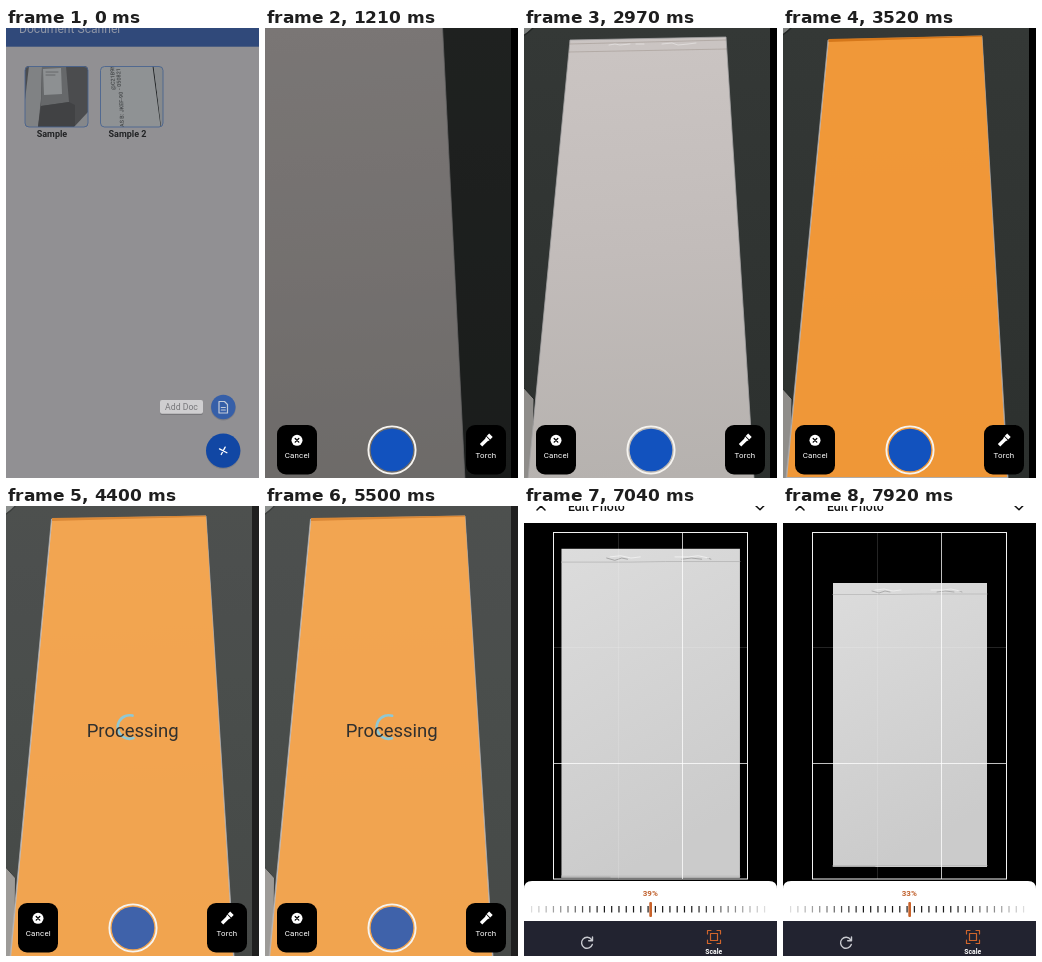
Write an HTML page that moves like this. It is 253 by 450 pixels and loops after 8000 ms.

```html
<!DOCTYPE html>
<html lang="en">
<head>
<meta charset="utf-8">
<title>Document scanning demo</title>
<style>
  html, body { margin: 0; width: 100%; height: 100%; overflow: hidden; background: #000; }
  svg { display: block; width: 100vw; height: 100vh; }
  text { font-family: Roboto, "Liberation Sans", sans-serif; }
  .mid { text-anchor: middle; }
  .line { fill: none; stroke-linecap: round; stroke-linejoin: round; }
</style>
</head>
<body>
<svg viewBox="0 0 253 450" preserveAspectRatio="none">
  <defs>
    <linearGradient id="paperTone" gradientUnits="userSpaceOnUse" x1="60" y1="0" x2="90" y2="450">
      <stop offset="0" stop-color="#cbc5c3"/><stop offset=".5" stop-color="#c2bcba"/><stop offset="1" stop-color="#b6b2af"/>
    </linearGradient>
    <linearGradient id="tableTone" x1="0" y1="0" x2="0" y2="1">
      <stop offset="0" stop-color="#343836"/><stop offset="1" stop-color="#2c302e"/>
    </linearGradient>
    <linearGradient id="scanTone" x1="0" y1="0" x2=".3" y2="1">
      <stop offset="0" stop-color="#dcdcdc"/><stop offset="1" stop-color="#cbcbcb"/>
    </linearGradient>
    <clipPath id="view"><rect width="246" height="450"/></clipPath>
    <clipPath id="thumb1"><rect x="19" y="38" width="63" height="61" rx="4"/></clipPath>
    <clipPath id="thumb2"><rect x="94" y="38" width="63" height="61" rx="4"/></clipPath>
    <clipPath id="stage"><rect y="17" width="253" height="358"/></clipPath>
  </defs>

  <g id="home">
    <rect width="253" height="450" fill="#919093"/>
    <rect width="253" height="18.700" fill="#30497a"/>
    <text x="13" y="5.300" font-size="12.100" fill="#8f96a6">Document Scanner</text>
    <g clip-path="url(#thumb1)">
      <path fill="#4b4c4e" d="M19 38h63v61H19z"/>
      <path fill="#808284" d="M23 38h13l-1 33-3 28H19V72z"/>
      <path fill="#66686a" d="M36 38h24l3 36-28 4z"/>
      <path fill="#8d9092" d="M37 41l18-1 1 26-18 1z"/>
      <path fill="#414244" d="M35 78l28-4 6 3v22H32z"/>
      <path fill="#85878a" d="M82 84v15H68z"/>
      <path class="line" stroke="#66686a" d="M40 44h12M40 47h9"/>
    </g>
    <g clip-path="url(#thumb2)">
      <path fill="#8f9294" d="M94 38h63v61H94z"/>
      <path class="line" stroke="#25282a" d="M147 38l8 60"/>
      <path fill="#878a8c" d="M148 38h9v61h-2z"/>
      <g font-size="5.500" font-weight="500" fill="#45484a">
        <text transform="translate(118 99) rotate(-92)">AS B: JKEF-90</text>
        <text transform="translate(109 62) rotate(-92)">@C21B9N</text>
        <text transform="translate(115 62) rotate(-92)">- 050821</text>
      </g>
    </g>
    <g fill="none" stroke="#4a6590" stroke-width=".9">
      <rect x="19" y="38.500" width="63" height="60.500" rx="4"/>
      <rect x="94.500" y="38.500" width="62.500" height="60.500" rx="4"/>
    </g>
    <g class="mid" font-size="9" font-weight="700" fill="#222325">
      <text x="46" y="109">Sample</text><text x="121.500" y="109">Sample 2</text>
    </g>
    <g id="dial">
      <rect x="154" y="373" width="43" height="14" rx="2" fill="#77767a"/>
      <rect x="154" y="372" width="43" height="13.700" rx="2" fill="#cfced0"/>
      <text class="mid" x="175.500" y="382" font-size="8.700" fill="#77777a">Add Doc</text>
      <circle cx="217.300" cy="380" r="12.500" fill="#7e7e84"/>
      <circle cx="217.300" cy="379" r="12.200" fill="#365fa8"/>
      <path class="line" stroke="#c3cbda" stroke-width="1.200" d="M213 373.500h5.500l3 3v8.500H213zM215.300 379.500h4M215.300 382h4"/>
    </g>
    <circle cx="217.200" cy="423.700" r="17.300" fill="#808086"/>
    <circle cx="217.200" cy="422.600" r="17.200" fill="#1147a4"/>
    <path id="plus" class="line" stroke="#fff" stroke-width="1.300" d="M-4.200 0h8.400M0-4.200v8.400"/>
  </g>

  <g id="camera">
    <rect width="253" height="450"/>
    <g id="preview" clip-path="url(#view)">
      <rect width="246" height="450" fill="url(#tableTone)"/>
      <g id="floor">
        <path fill="#8f8d8a" stroke="#222524" d="M-60 300L0 360L10 371L9 470H-60z"/>
        <path fill="#7d807e" stroke="#222524" stroke-width="1.500" d="M-40-40H34L9 0Q4 5-1 8L-40 30z"/>
      </g>
      <polygon id="paper" fill="url(#paperTone)" stroke="#a5a4a5" stroke-width=".8"/>
      <g id="fold" class="line">
        <path id="foldLine" stroke="#3a2a18" stroke-opacity=".16" stroke-width="1.200"/>
        <path id="foldMarks" stroke="#fff" stroke-opacity=".4" d="M39 5l6-1 5 1 10-1M92 4l10-1 6 2 10-1 8-1M66 4h8"/>
      </g>
      <g id="detected">
        <polygon id="cover" fill="#f4952f" fill-opacity=".93"/>
        <polygon id="rim" fill="#d5771a"/>
      </g>
    </g>
    <rect id="veil" width="253" height="450" fill="#fff" opacity=".12"/>
    <circle cx="127" cy="422" r="23.600" fill="none" stroke="#f6f4f0" stroke-width="1.900"/>
    <circle id="shutter" cx="127" cy="422" r="21.300"/>
    <g>
      <rect x="12" y="397" width="40" height="49.500" rx="9"/>
      <rect x="201" y="397" width="40" height="49.500" rx="9"/>
      <circle cx="32" cy="412.300" r="5.500" fill="#fff"/>
      <path class="line" stroke="#000" stroke-width="1.300" d="M30.200 410.500l3.600 3.600m0-3.600l-3.600 3.600"/>
      <g transform="translate(221 412.300) rotate(45)" fill="#fff">
        <path d="M-2.500-7h5v3.500h-5zM-2.500-2.700h5L1.700-.5V7h-3.400V-.5z"/>
      </g>
      <g class="mid" font-size="7.900" letter-spacing=".2" fill="#fff">
        <text x="32.300" y="430.300">Cancel</text><text x="220.900" y="430.300">Torch</text>
      </g>
    </g>
    <g id="busy">
      <circle id="spinner" class="line" r="11.800" stroke="#90c8d4" stroke-width="2.600" stroke-dasharray="44 31"/>
      <text class="mid" x="126.700" y="231" font-size="18.500" fill="#30302f">Processing</text>
    </g>
  </g>

  <g id="editor">
    <rect width="253" height="450"/>
    <g clip-path="url(#stage)">
      <g id="scan">
        <rect width="154" height="284" fill="url(#scanTone)"/>
        <path class="line" stroke="#b5b5b5" stroke-width=".7" d="M0 11.500H60L90 11H154M0 282.500H154"/>
        <path class="line" stroke="#9a9a9a" stroke-width=".7" d="M39 8l7 2 6-2 5 1M104 9l8-1 9 1M126 8l3 1M0 283.500H42"/>
        <path class="line" stroke="#f0f0f0" stroke-width=".8" d="M42 7l9-1 9 2 8-1M98 7l12 0 8-1 9 2"/>
      </g>
      <path fill="#000" fill-opacity=".72" fill-rule="evenodd" d="M0 17H253V375H0zM29 26V373H224V26z"/>
      <path stroke="#fff" stroke-opacity=".14" d="M94.500 26V373M29 141.500H224"/>
      <path stroke="#fff" stroke-opacity=".75" d="M158.500 26V373M29 257.500H224"/>
      <rect x="29.500" y="26.500" width="194" height="346.500" fill="none" stroke="#f2f2f2"/>
    </g>
    <rect width="253" height="17" fill="#fff"/>
    <text x="44" y="4.500" font-size="12.300" font-weight="500" fill="#111">Edit Photo</text>
    <path class="line" stroke="#111" stroke-width="1.500" d="M13-4l8 8m0-8l-8 8M232 0l4 3.700 8-8"/>
    <path fill="#fff" d="M0 420V383Q0 375 8 375H245Q253 375 253 383V420z"/>
    <text id="percent" class="mid" x="126.300" y="390" font-size="8" font-weight="700" fill="#c0602c"></text>
    <g id="ticks"></g>
    <rect x="125.300" y="396" width="2.700" height="15" rx="1" fill="#c8622a"/>
    <rect y="415" width="253" height="35" fill="#222330"/>
    <g class="line" stroke="#c9cad0" stroke-width="1.400">
      <path d="M67.500 433.500A5.500 5.500 0 1 0 68.300 438.500"/><path d="M68.500 431v3.800h-3.800"/>
    </g>
    <g class="line" stroke="#d0652c" stroke-width="1.200">
      <path d="M186.500 427.500h7v7h-7z"/>
      <path d="M183.500 428v-3.500h3.500M193 424.500h3.500v3.500M196.500 434v3.500h-3.500M187 437.500h-3.500v-3.500"/>
    </g>
    <text class="mid" x="189.700" y="448" font-size="6.800" font-weight="700" fill="#fff">Scale</text>
  </g>
</svg>
<script>
const LOOP = 8000, STEP = 110;
const $ = id => document.getElementById(id);
const set = (id, attrs) => { for (const k in attrs) $(id).setAttribute(k, attrs[k]); };
const show = (id, on) => set(id, { visibility: on ? "inherit" : "hidden" });
const ramp = (t, from, to) => Math.min(1, Math.max(0, (t - from) / (to - from)));
const ease = p => (1 - Math.cos(Math.PI * p)) / 2;
const mix = (a, b, p) => a + (b - a) * p;

// time, then the paper's corners: top left, top right, bottom right, bottom left
const PAPER = [
  [1210, -6, -110, 172, -112, 200, 452, -62, 452],
  [1980, 9, -80, 182, -82, 207, 451, -42, 451],
  [2860, 46, 13, 202, 10, 229, 451, 4, 451],
  [2970, 46, 12, 202, 9, 230, 451, 4, 451],
  [3520, 45, 12, 199, 8, 225, 450, 3, 450],
  [4400, 45.5, 13, 200, 10, 228, 451, 4, 451],
  [5500, 45.5, 13, 200, 10, 228, 451, 4, 451]
];

function track(rows, t) {
  let i = 0;
  while (i < rows.length - 2 && t >= rows[i + 1][0]) i++;
  const [a, b] = [rows[i], rows[i + 1]];
  const p = ease(ramp(t, a[0], b[0]));
  return a.slice(1).map((v, k) => mix(v, b[k + 1], p));
}

function drawHome(t) {
  const close = ramp(t, 0, 330);
  set("dial", { opacity: 1 - close });
  set("plus", { transform: `translate(217.2 422.8) rotate(${mix(28, 0, close)})` });
}

function drawCamera(t) {
  const q = track(PAPER, t), [x1, y1, x2, y2, x3, y3, x4, y4] = q;
  const found = t >= 3190, busy = t >= 4070;
  set("camera", { opacity: ramp(t, 0, 440) });
  show("preview", t >= 1210);
  set("preview", { opacity: mix(0.6, 1, ramp(t, 1210, 1430)) });
  set("floor", { transform: `translate(${x1 - 46} ${y1 - 12})` });
  set("paper", { points: q.join(" ") });
  set("cover", { points: [x1 + 0.8, y1, x2, y2, x3 - 1, y3 - 1, x4 + 1.2, y4 - 1].join(" ") });
  set("rim", { points: [x1 + 0.5, y1 - 1, x2, y2 - 0.5, x2, y2 + 0.8, x1 + 0.5, y1 + 2].join(" ") });
  set("foldLine", { d: `M${x1 - 0.5} ${y1 + 4}L${x2} ${y2 + 3}M${x1 - 1} ${y1 + 12}L${x2 + 0.5} ${y2 + 12}` });
  set("foldMarks", { transform: `translate(${x1} ${y1})` });
  show("fold", !found);
  show("detected", found);
  show("veil", busy);
  show("busy", busy);
  set("shutter", { fill: busy ? "#3f62aa" : "#1252be" });
  set("spinner", { transform: `translate(123.5 221) rotate(${70 + (t - 4400) * 0.33})` });
}

function drawEditor(t) {
  const pinch = ease(ramp(t, 6380, 7920));
  const width = mix(194, 154, pinch), scale = width / 154;
  set("editor", { opacity: ramp(t, 5500, 5830) });
  set("scan", {
    opacity: ramp(t, 5720, 5940),
    transform: `translate(${mix(29.5, 50, pinch)} ${mix(21, 77, pinch)}) scale(${scale})`
  });
  $("percent").textContent = Math.round(42 * width / 194) + "%";
}

for (let i = 0; i <= 32; i++) {
  const x = 7 + i * 7.28;
  const edge = 1 - Math.abs(i - 16) / 16;
  $("ticks").insertAdjacentHTML("beforeend",
    `<rect x="${x}" y="400" width="1.2" height="6.5" fill="#1a1a1a" opacity="${Math.min(1, 0.15 + edge * 1.4)}"/>`);
}

function draw(now) {
  const t = Math.floor(now % LOOP / STEP) * STEP;
  show("home", t < 440);
  show("camera", t > 0 && t < 5830);
  show("editor", t >= 5610);
  drawHome(t);
  drawCamera(t);
  drawEditor(t);
}

let start;
function tick(now) {
  start ??= now;
  draw(now - start);
  requestAnimationFrame(tick);
}
draw(0);
requestAnimationFrame(tick);
</script>
</body>
</html>
```
